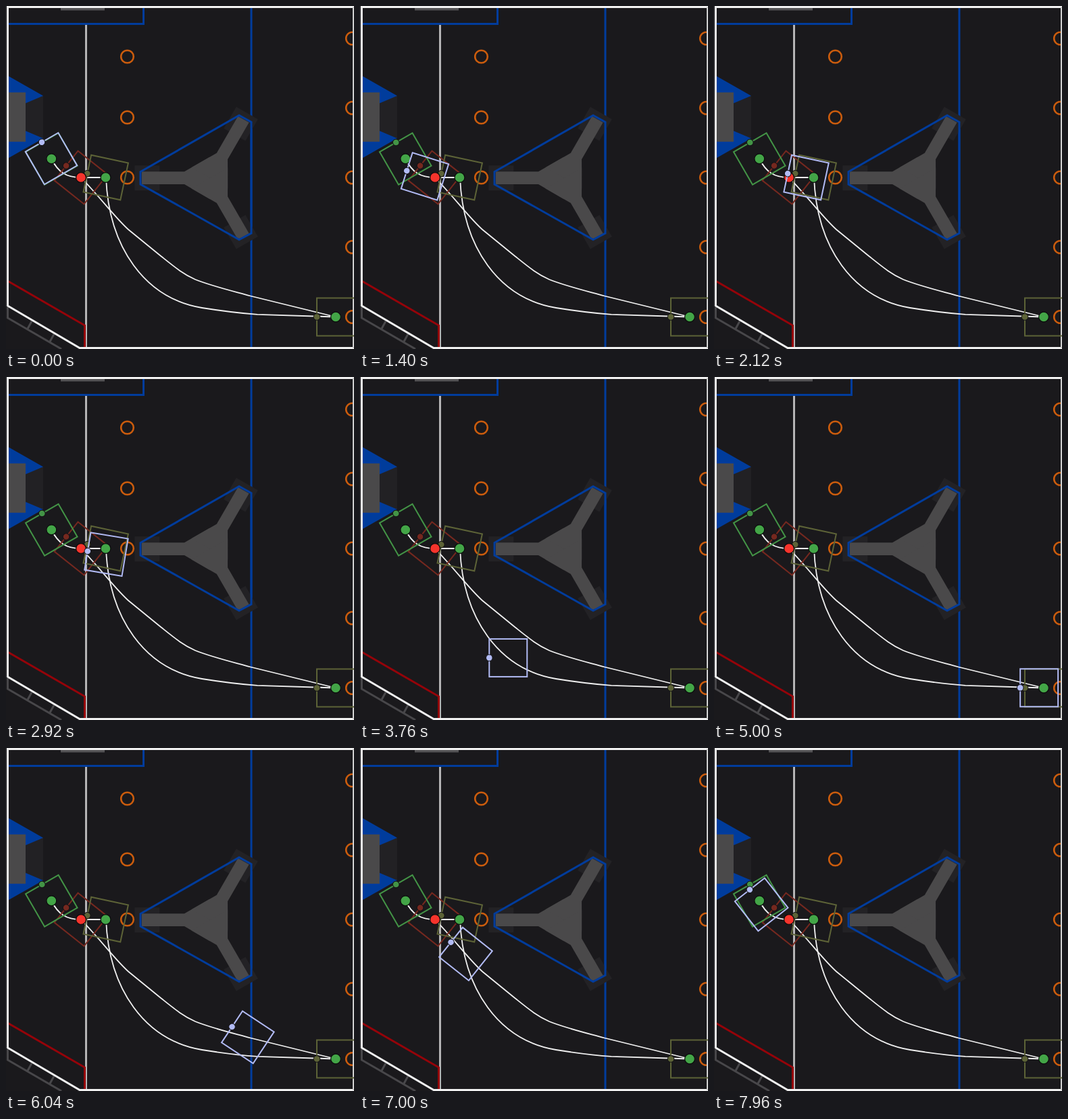
An HTML page that plays this animation: 515x508 px, repeating every 8 s.

```html
<!DOCTYPE html>
<html lang="en">
<head>
<meta charset="utf-8">
<title>Robot path preview</title>
<style>
  html, body { margin: 0; width: 100%; height: 100%; overflow: hidden; background: #1a191c; }
  svg { display: block; width: 515px; height: 508px; fill: none; }
  .blue { stroke: #003c9c; stroke-width: 3; }
  .orange { stroke: #cb5c0d; stroke-width: 2.6; }
  .path { stroke: #f0f0f0; stroke-width: 1.8; }
  .white { stroke: #f1f1f1; stroke-width: 3; }
  .wall { stroke: #48474a; stroke-width: 3; }
</style>
</head>
<body>
<svg viewBox="0 0 515 508">
  <defs>
    <g id="box">
      <rect x="-28" y="-28" width="56" height="56" fill="none" stroke="currentColor" stroke-width="2"/>
      <circle cx="28" r="4.8" fill="currentColor" stroke="#141316" stroke-width="1"/>
    </g>
    <rect id="foot" x="-111" y="-18.5" width="37" height="37" fill="#232225"/>
    <path id="arm" d="M-100.3-9.4H-37.3L0-31V31L-37.3 9.4H-100.3Z" fill="#4a494a"/>
  </defs>

  <!-- field -->
  <rect width="515" height="508" fill="#1a191c"/>
  <path d="M81 4.5H146" stroke="#555456" stroke-width="4"/>
  <path class="blue" d="M3 26.5H203.5V3M363 3V505"/>
  <path d="M118.5 28V506" stroke="#b5b4b5" stroke-width="3"/>
  <path d="M29 133H55V196H29Z" fill="#222124"/>
  <path d="M4 104L55 133L29 144V128H4ZM4 225L55 196L29 185V201H4Z" fill="#003c9c"/>
  <path d="M4 128H29V201H4Z" fill="#4a494a"/>
  <g id="tripod" transform="translate(301.3 254.7)"></g>
  <path class="blue" d="M199 245.5L345 162L363 172V336.5L345 346L199 264Z"/>
  <g id="rings" class="orange"></g>
  <path d="M3 407.5L116.5 473V506" stroke="#960309" stroke-width="3"/>
  <path class="wall" d="M2.5 446V462L82 508M38 467L32 478M71 486L65 497"/>
  <path class="white" d="M515 1.5H2.5V444L109 506.5H515"/>
  <path d="M514 1V507" stroke="#cfcfcf" stroke-width="2"/>

  <!-- routes -->
  <path class="path" d="M67 226C77 246 89 254 111 254L148 254"/>
  <path class="path" d="M148 254C152 358 206 433 290 447C315 451 345 455 372 456.8L488 460.5"/>
  <path class="path" d="M488 460.5L362 429.5C335 422 305 415 280 405C262 397 250 387 230 371L181 331C163 315 145 290 111 254"/>

  <g id="poses"></g>
  <g id="stops" stroke="#0c0c0d" stroke-width="1.2"></g>
  <use id="robot" href="#box" color="#b2bbf5"/>
</svg>
<script>
const $ = id => document.getElementById(id);
const pose = (x, y, angle) => `translate(${x} ${y}) rotate(${angle})`;

const turns = [0, 120, 240];
$('tripod').innerHTML = ['foot', 'arm'].map(part =>
  turns.map(a => `<use href="#${part}" transform="rotate(${a})"/>`).join('')).join('');

const rings = [75, 165, 254].map(y => [179.5, y])
  .concat([48, 151, 254, 357, 460.5].map(y => [512.5, y]));
$('rings').innerHTML = rings.map(([x, y]) => `<circle cx="${x}" cy="${y}" r="9.3"/>`).join('');

const poses = [
  [111, 254, 218.5, '#76281f'],
  [147.7, 254, 192, '#5d6337'],
  [488, 460.5, 180, '#5d6337'],
  [67.3, 226.3, 240, '#439446']
];
$('poses').innerHTML = poses.map(([x, y, a, color]) =>
  `<use href="#box" transform="${pose(x, y, a)}" color="${color}"/>`).join('');

const stops = [[67.3, 226.3], [147.5, 254], [488, 460.5], [111, 254, '#f6342c']];
$('stops').innerHTML = stops.map(([x, y, color = '#43a547']) =>
  `<circle cx="${x}" cy="${y}" r="7.4" fill="${color}"/>`).join('');

// Times in seconds, angles in degrees.
const LOOP = 8, DELAY = 0.43, CYCLE = 7.16, TURN_ACCEL = 118;
const routes = document.querySelectorAll('.path');
const legs = [
  { start: 0, end: 2.28, up: 0.64, down: 0.95, from: 240, to: 192 },
  { start: 2.28, end: 4.757, up: 0.64, down: 0.64, from: 192, to: 180 },
  { start: 4.757, end: CYCLE, up: 0.64, down: 0.64, from: 180, to: 218.5 }
].map((leg, i) => ({ ...leg, route: routes[i], length: routes[i].getTotalLength() }));

// Distance covered with steady acceleration, cruise and braking.
function travel({ start, end, up, down, length }, t) {
  const total = end - start, left = total - t;
  const speed = length / (total - (up + down) / 2);
  if (t < up) return speed * t * t / (2 * up);
  if (left < down) return length - speed * left * left / (2 * down);
  return speed * (t - up / 2);
}

// Turns as fast as the angular acceleration allows, then holds.
function heading({ from, to }, t) {
  const s = Math.min(1, t / (2 * Math.sqrt(Math.abs(to - from) / TURN_ACCEL)));
  const k = s < 0.5 ? 2 * s * s : 1 - 2 * (1 - s) ** 2;
  return from + (to - from) * k;
}

function draw(now) {
  const time = (now / 1000) % LOOP;
  const t = Math.max(0, time - DELAY) % CYCLE;
  const leg = legs.find(l => t < l.end);
  const local = t - leg.start;
  const { x, y } = leg.route.getPointAtLength(travel(leg, local));
  $('robot').setAttribute('transform', pose(x, y, heading(leg, local)));
}

let origin;
function frame(now) {
  origin ??= now;
  draw(now - origin);
  requestAnimationFrame(frame);
}
draw(0);
requestAnimationFrame(frame);
</script>
</body>
</html>
```
